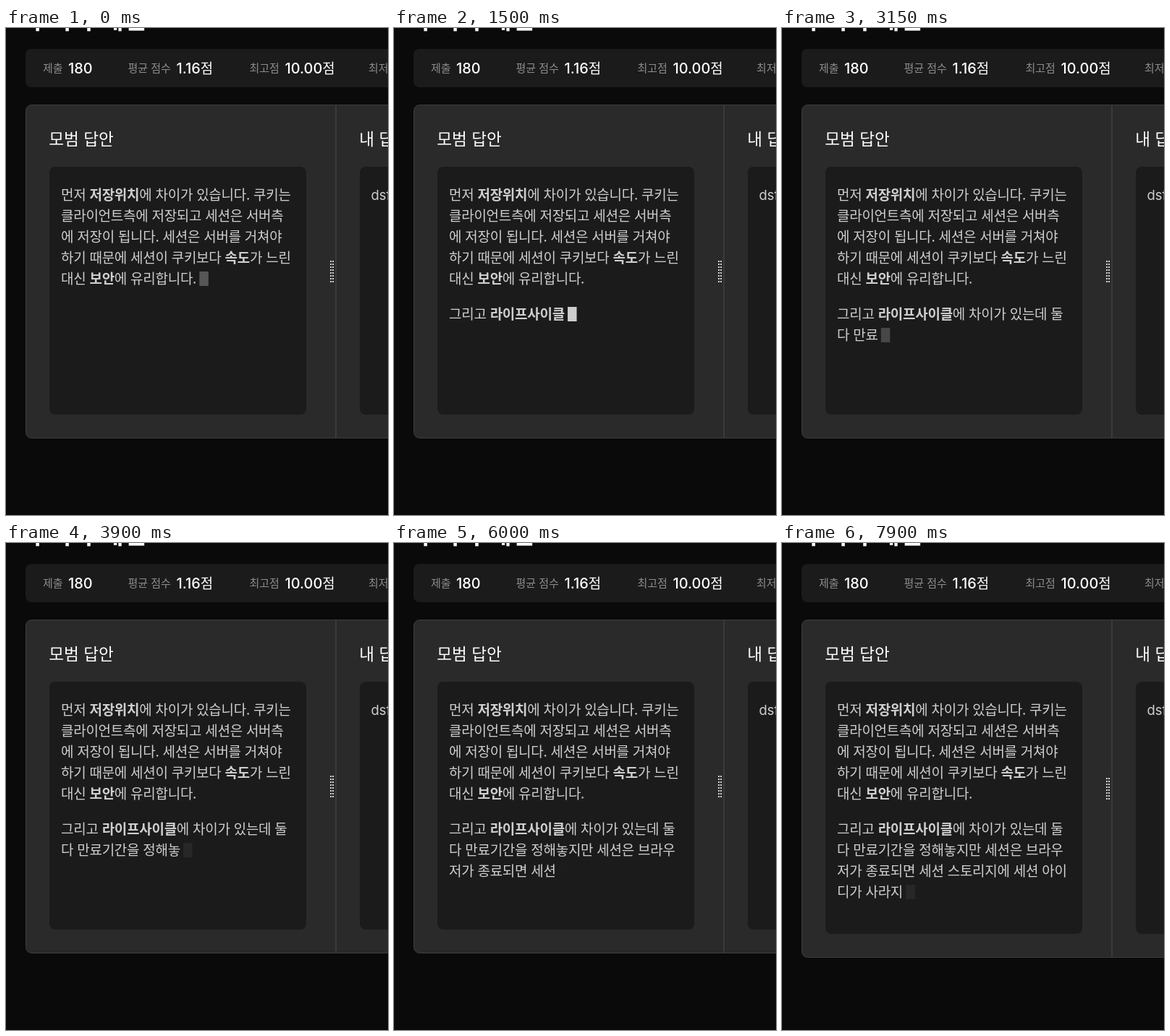
An HTML page that plays this animation: 528x674 px, repeating every 8 s.

```html
<!DOCTYPE html>
<html lang="ko">
<head>
<meta charset="utf-8">
<style>
  html, body { margin: 0; width: 100%; height: 100%; overflow: hidden; background: #0a0a0a; }
  svg { display: block; width: 528px; height: 674px; }
  text { font-family: "Noto Sans CJK KR", "Noto Sans CJK", sans-serif; white-space: pre; }
  .title { font-size: 34px; font-weight: 700; fill: #fff; }
  .label { font-size: 15px; fill: #8c8c8c; }
  .value { font: 500 19.9px Inter, "Noto Sans CJK KR", "Noto Sans CJK", sans-serif; fill: #fff; }
  .value tspan { font-size: 18.9px; }
  .heading { font-size: 22.6px; font-weight: 500; fill: #fff; }
  .body { font-size: 19px; letter-spacing: -.28px; fill: #cfcfcf; }
  .body tspan { font-weight: 700; }
  .latin { font: 18.5px Inter, sans-serif; fill: #cfcfcf; }
  .box { fill: #1b1b1b; }
</style>
</head>
<body>
<svg viewBox="0 0 528 674">
  <defs>
    <pattern id="dots" width="3" height="4" patternUnits="userSpaceOnUse">
      <rect width="2" height="2" fill="#d4d4d4"/>
    </pattern>
  </defs>
  <text class="title" x="28" y="1">쿠키와 세션</text>

  <rect class="box" x="27" y="29" width="600" height="53" rx="8"/>
  <text class="label" x="51" y="60.5">제출</text>
  <text class="value" x="86" y="63">180</text>
  <text class="label" x="168.5" y="60.5">평균 점수</text>
  <text class="value" x="235.5" y="63">1.16<tspan>점</tspan></text>
  <text class="label" x="336.5" y="60.5">최고점</text>
  <text class="value" x="385.5" y="63">10.00<tspan>점</tspan></text>
  <text class="label" x="501" y="60.5">최저점</text>

  <rect id="panel" x="27.5" y="106.5" width="600" rx="8" fill="#2a2a2a" stroke="#3e3e3e"/>
  <rect id="divider" x="455" y="107" width="2" fill="#3a3a3a"/>
  <text class="heading" x="59.3" y="161.5">모범 답안</text>
  <text class="heading" x="488.3" y="161.5">내 답안</text>
  <rect class="box" id="left" x="60" y="192" width="355" rx="8"/>
  <rect class="box" id="right" x="489" y="192" width="355" rx="8"/>
  <text class="latin" x="504.5" y="238">dsf</text>
  <g id="handle"><rect width="5" height="30" fill="url(#dots)"/></g>

  <g id="answer"></g>
  <rect id="cursor" width="12.5" height="20" fill="#cfcfcf"/>
</svg>
<script>
const LOOP = 8000, LEFT = 76, RIGHT = 399, LINE = 29, GAP = 4.2;
const $ = id => document.getElementById(id);

const intro = [
  '먼저 **저장위치**에 차이가 있습니다. 쿠키는',
  '클라이언트측에 저장되고 세션은 서버측',
  '에 저장이 됩니다. 세션은 서버를 거쳐야',
  '하기 때문에 세션이 쿠키보다 **속도**가 느린',
  '대신 **보안**에 유리합니다.'
];
const typed = [
  '그리고 **라이프사이클**에 차이가 있는데 둘 ',
  '다 만료기간을 정해놓지만 세션은 브라우',
  '저가 종료되면 세션 스토리지에 세션 아이',
  '디가 사라지'
];

// [time in ms, characters typed]
const pace = [[0, 0], [750, 7.5], [2250, 21.7], [2450, 23.8], [2640, 25], [3900, 37.7],
  [4300, 43.2], [5200, 49.9], [6000, 57.6], [6400, 61.7], [6550, 62], [6860, 65],
  [7150, 66], [7900, 75.7], [8000, 75.9]];

function typedCount(t) {
  const i = pace.findIndex(([time]) => time > t);
  const [t0, n0] = pace[i - 1], [t1, n1] = pace[i];
  return Math.floor(n0 + (n1 - n0) * (t - t0) / (t1 - t0));
}

function addLine(y) {
  const line = document.createElementNS('http://www.w3.org/2000/svg', 'text');
  line.setAttribute('class', 'body');
  line.setAttribute('x', LEFT);
  line.setAttribute('y', y);
  return $('answer').appendChild(line);
}

function setLine(line, source) {
  if (line.source === source) return;
  line.source = source;
  line.innerHTML = source.replace(/\*\*(.+?)\*\*/g, '<tspan>$1</tspan>');
}

function set(id, attributes) {
  for (const name in attributes) $(id).setAttribute(name, attributes[name]);
}

const introLines = intro.map((source, i) => {
  const line = addLine(238 + i * LINE);
  setLine(line, source);
  return line;
});
const typedLines = typed.map((_, i) => addLine(403 + i * LINE));

function render(t) {
  const count = typedCount(t);
  let rest = count, row = 0;
  typed.forEach((source, i) => {
    const shown = source.slice(0, Math.max(0, rest)).trimEnd();
    setLine(typedLines[i], shown);
    if (shown) row = i;
    rest -= source.length;
  });

  const last = count ? typedLines[row] : introLines[4];
  let x = LEFT + last.getComputedTextLength() + GAP;
  let y = count ? 386 + row * LINE : 337;
  if (x + 12 > RIGHT) {
    x = LEFT + GAP;
    y += LINE;
    row++;
  }
  const phase = (t + (count ? 15 : 195)) / 1000;
  set('cursor', { x, y, opacity: (1 - Math.cos(phase * 2 * Math.PI)) / 2 });

  // The panel grows to hold the fourth typed row.
  const grow = row > 2 ? 6 : 0;
  set('panel', { height: 461 + grow });
  set('divider', { height: 460 + grow });
  set('left', { height: 343 + grow });
  set('right', { height: 343 + grow });
  set('handle', { transform: `translate(448 ${322 + grow / 2})` });
}

const start = performance.now();
function frame() {
  render((performance.now() - start) % LOOP);
  requestAnimationFrame(frame);
}
frame();
</script>
</body>
</html>
```
